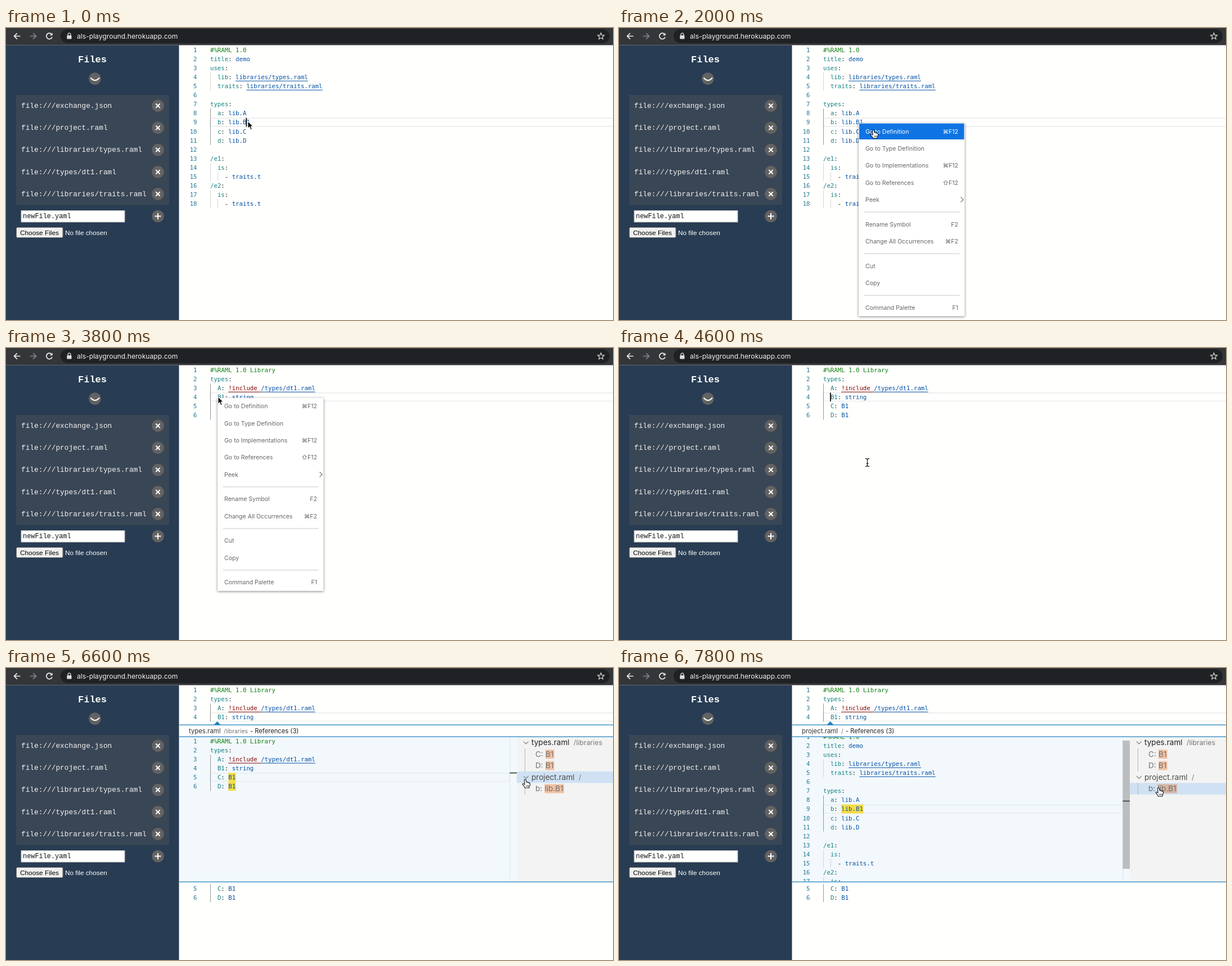
Animation of 1079 by 519 pixels, one loop 8000 ms. Source, as an HTML page:

```html
<!DOCTYPE html>
<html lang="en">
<head>
<meta charset="utf-8">
<title>Editor walkthrough</title>
<style>
  html, body { margin: 0; width: 100%; height: 100%; overflow: hidden; background: #fffffe; }
  svg { display: block; width: 1079px; height: 519px; }
  text { white-space: pre; }
  .code { font: 10.7px "DejaVu Sans Mono", monospace; }
  .ui { font-family: Inter, "DejaVu Sans", sans-serif; }
  .form { font: 11.8px "Liberation Sans", sans-serif; }
  .file { font: 12.8px "Liberation Mono", monospace; }
  .shadow { filter: drop-shadow(0 1px 2px rgba(0, 0, 0, .5)); }
</style>
</head>
<body>
<svg viewBox="0 0 1079 519">
  <defs><clipPath id="peekClip"><rect x="308" y="123" width="600" height="256.5"/></clipPath></defs>
  <g id="frame"></g>
  <g id="scene"></g>
</svg>
<script>
const LOOP = 8000, STEP = 200;
const CHAR = 6.442, LINE = 16.06, CODE_X = 363;
const KEY = '#148080', VALUE = '#0451a5', DARK = '#222', COMMENT = '#138013', TAG = '#800000';

const project = {
  active: [8, 11],
  lines: `#%RAML 1.0
title: demo
uses:
  lib: libraries/types.raml
  traits: libraries/traits.raml

types:
  a: lib.A
  b: lib.B1
  c: lib.C
  d: lib.D

/e1:
  is:
    - traits.t
/e2:
  is:
    - traits.t`.split('\n')
};
const library = {
  active: [3, 6],
  lines: `#%RAML 1.0 Library
types:
  A: !include /types/dt1.raml
  B1: string
  C: B1
  D: B1`.split('\n')
};

// Menu rows: offset of the centre, label, shortcut
const menuItems = [
  [14.5, 'Go to Definition', '⌘F12'], [45, 'Go to Type Definition', ''],
  [75, 'Go to Implementations', '⌘F12'], [105.5, 'Go to References', '⇧F12'],
  [136, 'Peek', ''], [179.5, 'Rename Symbol', 'F2'],
  [210, 'Change All Occurrences', '⌘F2'], [253.5, 'Cut', ''],
  [284, 'Copy', ''], [327.5, 'Command Palette', 'F1']
];
const menuRules = [158, 232, 306];

// Pointer path: time, x, y, shape
const pointerPath = [
  [0, 430, 166, 'arrow'], [1200, 430, 166, 'arrow'], [1400, 440, 174, 'hand'],
  [1600, 452, 181, 'hand'], [2200, 452, 181, 'hand'], [2400, 452, 181, 'beam'],
  [2800, 440, 165, 'beam'], [3400, 377, 87, 'beam'], [3600, 377, 87, 'arrow'],
  [3800, 377, 87, 'arrow'], [4000, 405, 142, 'hand'], [4200, 434, 194, 'hand'],
  [4400, 438, 199, 'beam'], [4600, 441.5, 203.5, 'beam'], [5000, 448, 212.5, 'beam'],
  [5400, 448, 212.5, 'beam'], [6000, 830, 203, 'beam'], [6200, 923, 198, 'hand'],
  [6800, 923, 198, 'hand'], [7200, 959, 213, 'hand'], [LOOP, 959, 213, 'hand']
];

const rect = (x, y, w, h, fill, extra = '') =>
  `<rect x="${x}" y="${y}" width="${w}" height="${h}" fill="${fill}" ${extra}/>`;
const path = (d, stroke, width = 1, fill = 'none') =>
  `<path d="${d}" stroke="${stroke}" stroke-width="${width}" fill="${fill}"/>`;
const text = (x, y, str, fill, cls, extra = '') =>
  `<text x="${x}" y="${y}" fill="${fill}" class="${cls}" ${extra}>${str}</text>`;
const ui = (x, y, str, size, fill, extra = '') =>
  text(x, y, str, fill, 'ui', `font-size="${size}" ${extra}`);
const disc = (x, y) => `<circle cx="${x}" cy="${y}" r="10.8" fill="#626262"/>`;

function toolbar() {
  return rect(0, 0, 1079, 30.5, '#35363a') +
    rect(97, 2, 976, 25, '#202124', 'rx="12.5"') +
    path('M25.5 14.5H15M19.8 9.3L14.6 14.5L19.8 19.7', '#eee', 1.7) +
    path('M42.5 14.5H53M48.2 9.3L53.4 14.5L48.2 19.7', '#85868a', 1.7) +
    path('M81 11A5.2 5.2 0 1 0 82 16', '#eee', 1.7) +
    path('M82.6 8.5V13.2H77.8Z', 'none', 0, '#eee') +
    rect(108.3, 13, 8.2, 6.5, '#ddd', 'rx="1"') +
    path('M110 13V11.5A2.4 2.4 0 0 1 114.8 11.5V13', '#ddd', 1.3) +
    ui(126, 18.6, 'als-playground.herokuapp.com', 12.15, '#f1f1f1') +
    path('M1057.5 8.8L1059.1 12.7L1063.3 13L1060.1 15.7L1061.1 19.8L1057.5 17.6L1053.9 19.8L1054.9 15.7L1051.7 13L1055.9 12.7Z', '#ddd', 1.2);
}

function sidebar() {
  const files = ['exchange.json', 'project.raml', 'libraries/types.raml', 'types/dt1.raml', 'libraries/traits.raml'];
  const rows = files.map((name, i) => {
    const y = 138.2 + i * 39.2;
    return text(27, y + 3.8, 'file:///' + name, '#f4f4f4', 'file') + disc(270, y) +
      path(`M266.3 ${y - 3.7}l7.4 7.4m0 -7.4l-7.4 7.4`, '#fff', 2);
  }).join('');
  return rect(0, 30.5, 307.5, 489, '#283c53') +
    text(128, 61, 'Files', '#fff', 'file', 'style="font-size:17px;font-weight:bold"') +
    disc(158, 90) + path('M150.5 88.5Q158 97.5 166 88.5', '#fff', 2) +
    rect(18, 119, 272, 195.5, '#394655') + rows +
    rect(27, 324.5, 184, 20.5, '#fff', 'stroke="#bbb"') +
    text(30, 338.3, 'newFile.yaml', '#111', 'file', 'style="font-size:11.9px"') +
    disc(270, 334.5) + path('M264.5 334.5h11m-5.5 -5.5v11', '#fff', 2) +
    rect(18.5, 354.5, 82.5, 18, '#efefef', 'stroke="#777" rx="2"') +
    text(25, 367.6, 'Choose Files', '#000', 'form') +
    text(105, 367.6, 'No file chosen', '#fff', 'form');
}

function codeLine(line, baseline) {
  if (line[0] === '#') return text(CODE_X, baseline, line, COMMENT, 'code');
  const [, indent, dash = '', key = '', colon = '', tag = '', value] =
    line.match(/^( *)(- )?(?:([\w\/]+)(: ?))?(!include )?(.*)$/);
  let x = CODE_X + indent.length * CHAR, out = '';
  for (const [str, fill] of [[dash, DARK], [key, KEY], [colon, DARK], [tag, TAG], [value, VALUE]]) {
    if (!str) continue;
    const width = str.length * CHAR;
    out += text(x, baseline, str, fill, 'code');
    if (value.endsWith('.raml') && (fill === VALUE || fill === TAG))
      out += rect(x, baseline + 2.5, width, 1, fill);
    x += width;
  }
  return out;
}

// Lines first..last of a document, with the centre of line 1 at top
function code(doc, top, first = 1, last = doc.lines.length) {
  let out = '';
  for (let n = first; n <= last; n++) {
    const line = doc.lines[n - 1], y = top + (n - 1) * LINE;
    const color = n >= doc.active[0] && n <= doc.active[1] ? '#959595' : '#d6d6d6';
    for (let col = 0; col < line.search(/\S|$/); col += 2)
      out += rect(CODE_X + col * CHAR, y - 8, 1, LINE, color);
    out += text(339.5, y + 4, n, '#237893', 'code', 'text-anchor="end"') + codeLine(line, y + 4);
  }
  return out;
}

const currentLine = (n, top, right, color) => {
  const y = top + (n - 1) * LINE - 7.3;
  return rect(CODE_X, y, right - CODE_X, 14.6, 'none', `stroke="${color}" stroke-width="1.5"`);
};

function menu(x, y, pointer) {
  const hovered = pointer.shape === 'hand' &&
    menuItems.find(([c]) => Math.abs(pointer.y - y - c) < 15);
  const rows = menuItems.map(item => {
    const [c, label, keys] = item, hot = item === hovered, fill = hot ? '#fff' : '#666';
    return (hot ? rect(x + 1, y + c - 14, 186.5, 28.3, '#0f74e3') : '') +
      ui(x + 12, y + c + 3.8, label, 10.55, fill) +
      ui(x + 177, y + c + 3.8, keys, 10.55, fill, 'text-anchor="end"');
  }).join('');
  return rect(x, y, 188.5, 343, '#fff', 'class="shadow"') + rows +
    menuRules.map(c => rect(x + 10, y + c - .5, 169.5, 1, '#c8c8c8')).join('') +
    path(`M${x + 181.5} ${y + 131.5}l4.5 4.5l-4.5 4.5`, '#666', 1.1);
}

const chevron = (y, open) => path(open ? `M920 ${y - 2}l4.3 4.3l4.3 -4.3` : `M922.5 ${y - 4.3}l4.3 4.3l-4.3 4.3`, '#777', 1.1);

function tree(t) {
  const expanded = t >= 6400, selected = t < 6400 ? 1 : t < 7400 ? 3 : 4;
  const centre = row => 132.7 + row * 20.45;
  const folder = (row, name, dir, dirX, open) =>
    chevron(centre(row), open) + ui(934, centre(row) + 4.7, name, 13.6, row ? '#4c4c4c' : '#222') +
    ui(dirX, centre(row) + 4.5, dir, 12.35, '#777');
  const match = (row, key, value, x, width) =>
    rect(922, centre(row) - 10.2, 1, 20.5, '#b5b5b5') +
    rect(x, centre(row) - 8, width, 16, 'rgba(234,92,0,.33)') +
    ui(941, centre(row) + 4.7, key + ':', 13.6, '#707070') +
    ui(x, centre(row) + 4.7, value, 13.6, '#707070');
  return rect(908, 123, 171, 256.5, '#f3f3f3') +
    rect(908, centre(selected) - 10.2, 171, 20.5, '#cfe1f3') +
    folder(0, 'types.raml', '/libraries', 1009, true) +
    match(1, 'C', 'B1', 959, 15.5) + match(2, 'D', 'B1', 959, 15.5) +
    folder(3, 'project.raml', '/', 1018, expanded) +
    (expanded ? match(4, 'b', 'lib.B1', 957.5, 34.5) : '');
}

function peek(t) {
  const inProject = t >= 7400;
  const doc = inProject ? project : library, top = inProject ? 122 : 130;
  const mark = (n, chars) => rect(CODE_X + 5 * CHAR, top + (n - 1) * LINE - 7.8, chars * CHAR + .5, 15.8, '#f4dc45');
  const [name, dir, dirX, titleX] = inProject ? ['project.raml', '/', 395, 403] : ['types.raml', '/libraries', 387, 434];
  return path('M369.5 101L375.5 95L381.5 101Z', 'none', 0, '#1a7fc0') +
    rect(308, 101, 771, 279.5, '#fffffe') + rect(308, 123, 600, 257, '#f2f8fc') +
    ui(325, 115.8, name, 11.35, '#333') + ui(dirX, 115.5, dir, 10.4, '#777') +
    ui(titleX, 115.8, '- References (3)', 11.2, '#222') +
    '<g clip-path="url(#peekClip)">' +
    currentLine(inProject ? 9 : 5, top, 895, '#e7edf0') +
    (inProject ? mark(9, 6) : mark(5, 2) + mark(6, 2)) + code(doc, top) + '</g>' +
    rect(895, 123, 1, 257, '#dde4e8') +
    (inProject ? rect(895.5, 129, 12.5, 228, '#bbbdbe') : '') +
    rect(895.5, inProject ? 235.5 : 185.5, 12.5, 2, '#49564a') + tree(t) +
    [101, 122, 380].map(y => rect(308, y - .5, 771, 1.3, '#2685c0')).join('') +
    code(library, 327.8, 5, 6);
}

function pointerAt(t) {
  const i = pointerPath.findLastIndex(p => p[0] <= t);
  const [t0, x0, y0, shape] = pointerPath[i], [t1, x1, y1] = pointerPath[i + 1];
  const k = (t - t0) / (t1 - t0);
  return { x: x0 + (x1 - x0) * k, y: y0 + (y1 - y0) * k, shape };
}

const pointerShapes = {
  arrow: path('M0 0V12.3L2.9 9.6L5 14.6L7.2 13.7L5.1 8.8H9Z', '#fff', .9, '#000'),
  beam: path('M-3.5 -7Q0 -7 0 -5Q0 -7 3.5 -7M0 -5V5M-3.5 7Q0 7 0 5Q0 7 3.5 7M-1.8 2H1.8', '#222', 1.3),
  hand: path('M-1.6 1Q0 -1 1.3 1L2.2 5Q4 4 4.6 5.5Q6.3 4.8 6.8 6.4Q8.5 6 8.6 8Q8.7 11 7 13V15H-.5Q-1 13 -3 11.2Q-5.2 8.6 -4.6 7.7Q-3.4 6.8 -1 9Z', '#111', 1.1, '#fff') +
    path('M2 10.3V13M4 10.3V13M6 10.3V13', '#111', .8)
};

function scene(t) {
  const pointer = pointerAt(t), inLibrary = t >= 2400, peeking = t >= 5000;
  const firstMenu = t >= 600 && t < 2400, secondMenu = t >= 3600 && t < 4400;
  const doc = inLibrary ? library : project, line = inLibrary ? 4 : 9;
  const caret = !firstMenu && !secondMenu && !peeking;
  return currentLine(line, 39, 1082, '#ebebeb') + code(doc, 39, 1, peeking ? 4 : undefined) +
    (caret ? rect(inLibrary ? 375 : 426.5, 39 + (line - 1) * LINE - 7.8, 1.7, 15.5, '#000') : '') +
    (peeking ? peek(t) : '') +
    (firstMenu ? menu(426, 169.2, pointer) : '') +
    (secondMenu ? menu(376, 88.8, pointer) : '') +
    `<g transform="translate(${pointer.x} ${pointer.y})">${pointerShapes[pointer.shape]}</g>`;
}

document.getElementById('frame').innerHTML = toolbar() + sidebar();
const stage = document.getElementById('scene');
let shown = -1;
function tick() {
  const t = Math.floor(performance.now() % LOOP / STEP) * STEP;
  if (t !== shown) stage.innerHTML = scene(shown = t);
  requestAnimationFrame(tick);
}
tick();
</script>
</body>
</html>
```
